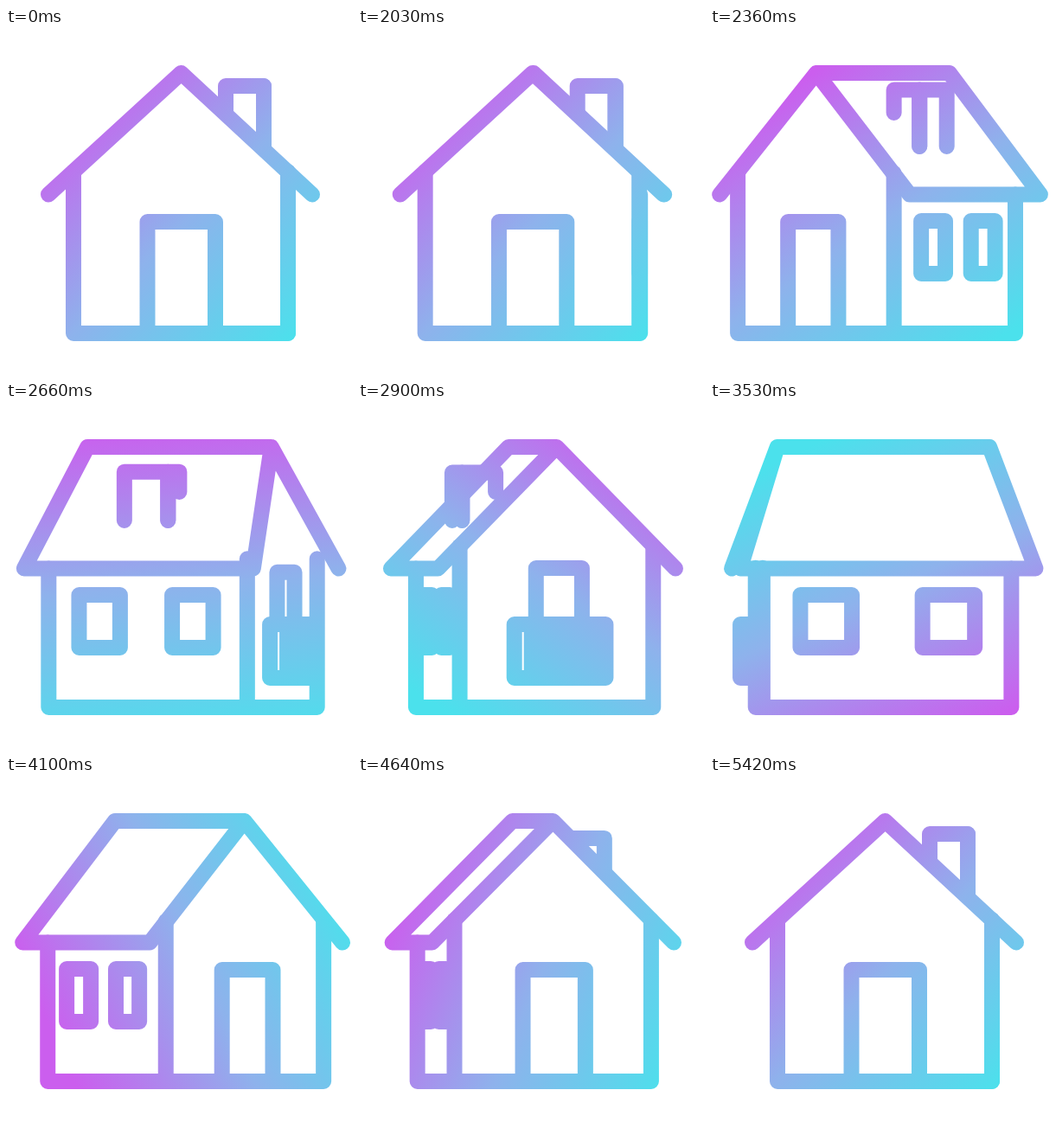
An HTML page with a canvas for the animation above (5.45 s loop, 400 by 400 pixels).

```html
<!DOCTYPE html>
<html lang="en">
<head>
<meta charset="utf-8">
<title>Turning house</title>
<style>
html, body { margin: 0; width: 100%; height: 100%; overflow: hidden; background: #fff; }
canvas { display: block; width: 400px; height: 400px; }
</style>
</head>
<body>
<canvas id="stage" width="400" height="400"></canvas>
<script>
const ctx = document.getElementById('stage').getContext('2d');
const LOOP = 5450, START = 2000, TURN = 3420;
const RIDGE = 52, EAVE = 192.5, FLOOR = 353;

// Cubic bezier easing with control points (x1, 0) and (x2, 1)
function ease(x, x1, x2) {
  let lo = 0, hi = 1;
  for (let i = 0; i < 30; i++) {
    const t = (lo + hi) / 2, s = 1 - t;
    if (3 * x1 * t * s * s + 3 * x2 * t * t * s + t * t * t < x) lo = t; else hi = t;
  }
  return lo * lo * (3 - 2 * lo);
}

// Value at position q in a list of poses, linear in between
function at(poses, q) {
  const i = Math.min(Math.floor(q), poses.length - 2);
  return poses[i] + (poses[i + 1] - poses[i]) * (q - i);
}

function line(...pts) {
  ctx.beginPath();
  pts.forEach(p => ctx.lineTo(p[0], p[1]));
  ctx.stroke();
}

function box(l, t, r, b) {
  ctx.strokeRect(Math.min(l, r), t, Math.abs(r - l), b - t);
}

function arch(l, r, top, leftEnd, rightEnd) {
  line([l, leftEnd], [l, top], [r, top], [r, rightEnd]);
}

// Poses per half turn: gable full, corner view, side full, corner view, gable full
const gableLeft = {
  wall: [[78, 27, 54], [326, 200, 54], [326, 356, 348]],
  apex: [[202.5, 114, 76], [202.5, 285, 325]],
  eave: [[49, 7, 26], [354, 217, 26], [354, 385, 376]],
  top: [166, 168, 193],
  windows: [[326, 235, 98], [326, 266, 159], [326, 299, 243], [326, 330, 305]],
  door: [[163.5, 82, 54], [242, 138, 54]],
  unit: [[145, 56.5, 34], [259, 145, 52]],
  pipe: [[173, 83, 54], [231, 126, 54]]
};
const gableRight = {
  wall: [[348, 373, 326], [348, 200, 78], [54, 44, 78]],
  apex: [[325, 286, 202.5], [76, 115, 202.5]],
  eave: [[376, 394, 354], [376, 183, 49], [26, 15, 49]],
  top: [193, 168, 166],
  windows: [[98, 69, 78], [159, 101, 78], [243, 134, 78], [305, 165, 78]],
  door: [[348, 262, 163.5], [348, 318, 242]],
  unit: [[349, 255, 145], [367, 343.5, 259]],
  pipe: [[348, 274, 173], [348, 317, 231]]
};

function drawUnit(l, r, slit) {
  box(l, 257, r, 319);
  if (r - l > slit) ctx.fillRect(l + slit, 257, r - l - slit, 62);
}

function drawChimney(q) {
  const top = at([67, 72, 77, 85, 80, 85, 85, 85, 67], q);
  if (q >= 4) {
    arch(at([150, 190, 200, 215, 254], q - 4), at([106, 150, 200, 250, 298], q - 4), top, 100, 137);
    return;
  }
  const front = at([298, 236, 156, 115, 106], q);
  const back = at([298, 271, 220, 150, 106], q);
  arch(front, back, top, 137, 137);
  if (q < 2) arch(at([254, 208, 156], q), front, top, 98, 137);
  else arch(back, at([220, 178, 150], q - 2), top, 137, 104);
}

function drawHouse(q, paint) {
  const m = q % 4, u = m % 2, pose = m < 2 ? gableLeft : gableRight;
  const get = list => list.map(p => at(p, u));
  const [g, mid, end] = get(pose.wall);
  const [near, far] = get(pose.apex);
  const [eg, em, ee] = get(pose.eave);
  const top = at(pose.top, u);
  const frontSeen = q < 2 || q >= 6;

  // Parts behind the house, covered by its white silhouette
  if (q >= 4) drawChimney(q);
  if (frontSeen && q > 1 && q < 7) {
    if (q < 2) drawUnit(at([280, 349], q - 1), at([320, 367], q - 1), 0);
    else drawUnit(at([34, 80], q - 6), at([52, 130], q - 6), 0);
  }
  ctx.fillStyle = '#fff';
  ctx.beginPath();
  [[eg, EAVE], [near, RIDGE], [far, RIDGE], [ee, EAVE]].forEach(p => ctx.lineTo(p[0], p[1]));
  ctx.fill();
  ctx.fillRect(Math.min(g, end), top, Math.abs(end - g), FLOOR - top);
  ctx.fillStyle = paint;

  line([g, top], [g, FLOOR], [end, FLOOR], [end, EAVE]);
  line([mid, top], [mid, FLOOR]);
  line([eg, EAVE], [near, RIDGE], [em, EAVE], [ee, EAVE], [far, RIDGE], [near, RIDGE]);

  const w = get(pose.windows);
  box(w[0], 223, w[1], 284);
  box(w[2], 223, w[3], 284);

  if (frontSeen) {
    const [l, r] = get(pose.door);
    arch(l, r, 224, FLOOR, FLOOR);
  } else {
    const [l, r] = get(pose.pipe);
    arch(l, r, at(m < 2 ? [192, 192, 201] : [201, 192, 192], u), 257, 257);
    drawUnit(...get(pose.unit), q < 4 ? 11 : 0);
  }
  if (q < 4) drawChimney(q);
}

function frame(now) {
  const x = Math.min(1, Math.max(0, (now % LOOP - START) / TURN));
  const q = x === 1 ? 0 : 8 * ease(x, 0.182, 0.243);
  const angle = Math.PI * (0.25 + 2 * ease(x, 0.36, 0.42));
  const dx = 188 * Math.cos(angle), dy = 188 * Math.sin(angle);
  const paint = ctx.createLinearGradient(220 - dx, 210 - dy, 220 + dx, 210 + dy);
  paint.addColorStop(0, '#cb5eee');
  paint.addColorStop(0.5, '#8eb2ec');
  paint.addColorStop(1, '#4be1ec');

  ctx.clearRect(0, 0, 400, 400);
  ctx.strokeStyle = ctx.fillStyle = paint;
  ctx.lineWidth = 18;
  ctx.lineCap = ctx.lineJoin = 'round';
  drawHouse(Math.min(q, 7.9999), paint);
  requestAnimationFrame(frame);
}
requestAnimationFrame(frame);
</script>
</body>
</html>
```
